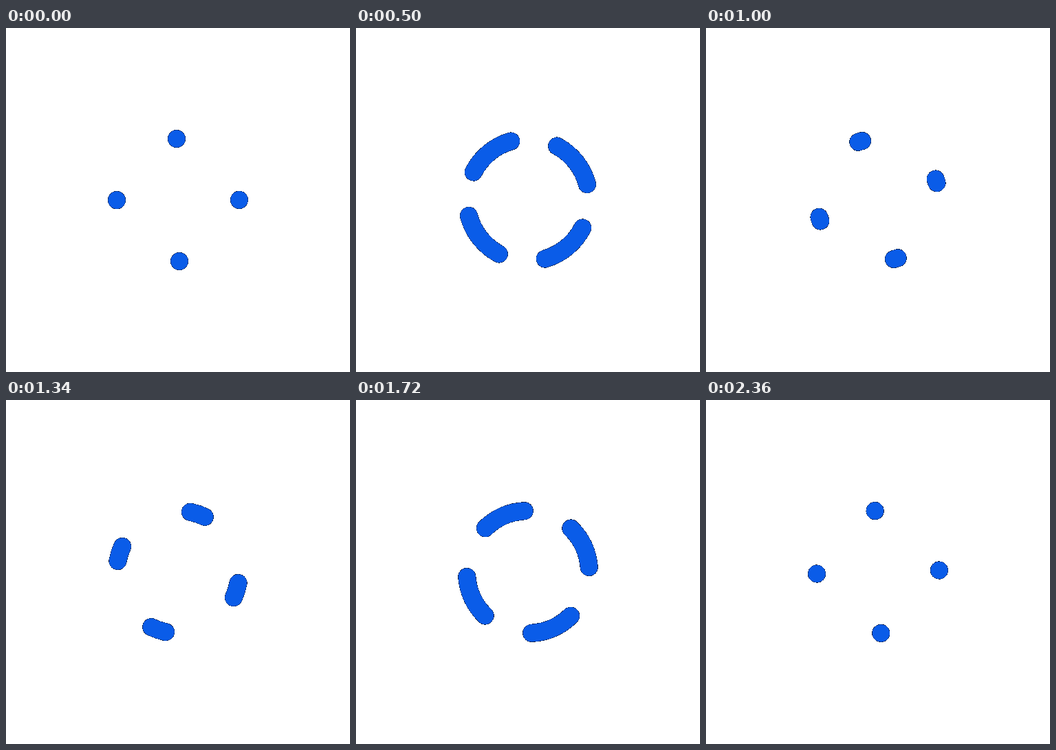
An HTML page with a canvas that plays this animation: 500x500 px, repeating every 2.38 s.

```html
<!DOCTYPE html>
<html lang="en">
<head>
<meta charset="utf-8">
<title>Arc spinner</title>
<style>
  html, body { margin: 0; height: 100%; overflow: hidden; background: #fff; }
  canvas { display: block; }
</style>
</head>
<body>
<canvas id="stage" width="500" height="500"></canvas>
<script>
const ctx = document.getElementById('stage').getContext('2d', { willReadFrequently: true });
const LOOP = 2380, SWEEP = 1190, RESTART = 1180;
const RADIUS = 89, WIDTH = 25.5;
const SLOTS = [-1.4, 89.8, 178.6, 269.8]; // degrees clockwise from the top

// Cubic Bezier easing with control points (x1, 0) and (x2, 1)
function ease(x, x1, x2) {
  if (x <= 0) return 0;
  if (x >= 1) return 1;
  let low = 0, high = 1;
  for (let i = 0; i < 24; i++) {
    const s = (low + high) / 2, r = 1 - s;
    if (3 * r * r * s * x1 + 3 * r * s * s * x2 + s ** 3 < x) low = s;
    else high = s;
  }
  return low * low * (3 - 2 * low);
}

function strokeArcs(tail, head) {
  for (const slot of SLOTS) {
    const angle = deg => (slot + deg - 90) * Math.PI / 180;
    ctx.beginPath();
    ctx.arc(250, 250, RADIUS, angle(tail), angle(Math.max(head, tail + 0.05)));
    ctx.stroke();
  }
}

// Turn the soft edge into a hard, dark rim: partly covered pixels fade to black
function hardenEdges() {
  const image = ctx.getImageData(140, 140, 220, 220), px = image.data;
  for (let i = 0; i < px.length; i += 4) {
    const cover = px[i + 3] / 255;
    for (let c = 0; c < 3; c++) px[i + c] *= cover;
    px[i + 3] = cover > 0.12 ? 255 : 0;
  }
  ctx.putImageData(image, 140, 140);
}

function draw(now) {
  const t = now % LOOP;
  const p = (t % RESTART) / SWEEP;
  const spin = 180 * t / LOOP;
  const head = spin + 180 * ease(p / 0.9, 0.35, 0.263);
  const tail = spin + 180 * ease((p - 0.11) / 0.89, 0.38, 0.28);

  ctx.clearRect(0, 0, 500, 500);
  ctx.lineCap = 'round';
  ctx.lineWidth = WIDTH;
  ctx.strokeStyle = '#0a5ce8';
  strokeArcs(tail, head);
  hardenEdges();
  requestAnimationFrame(() => draw(performance.now()));
}
draw(0);
</script>
</body>
</html>
```
